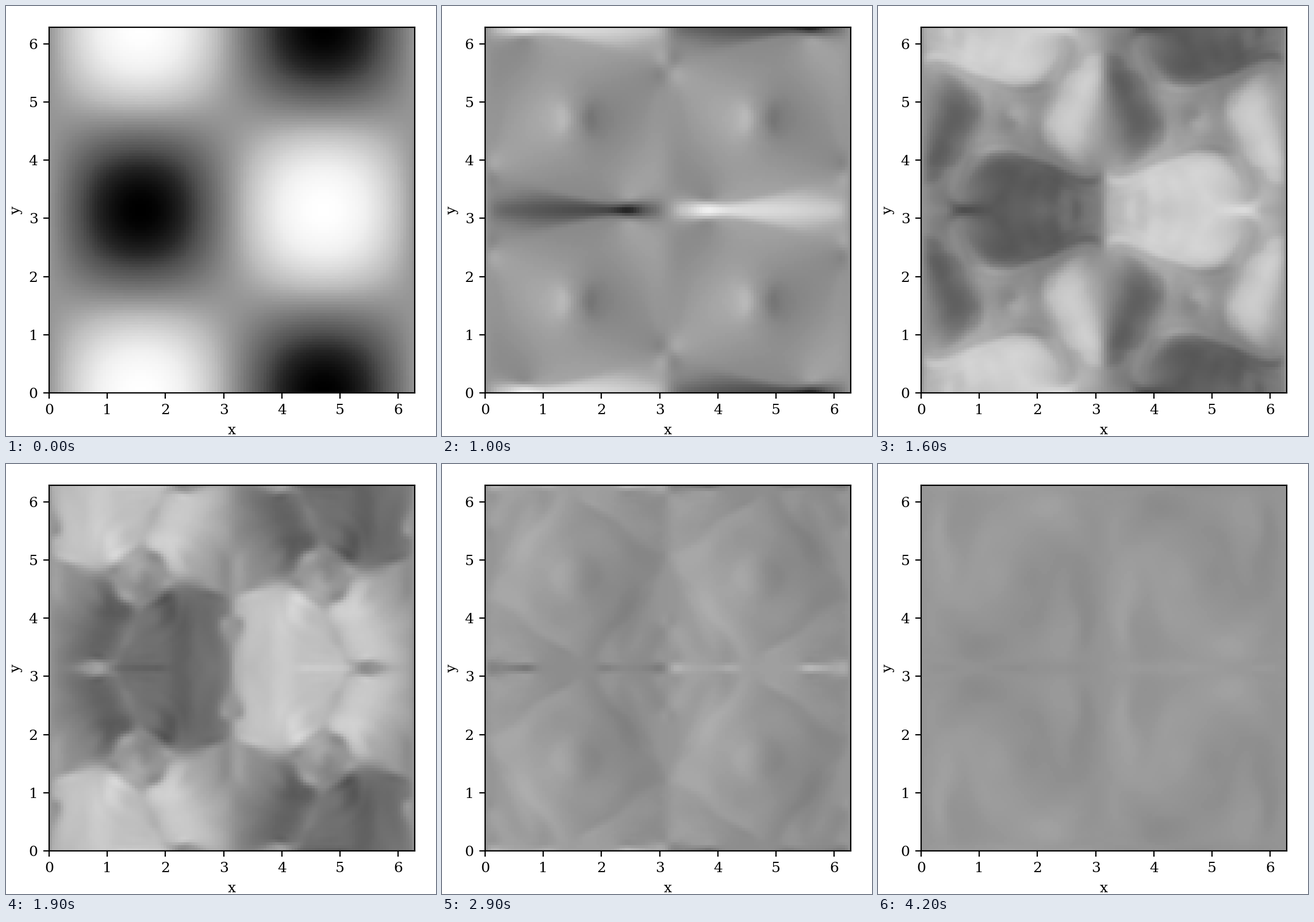
Recreate the animation shown at these times as a matplotlib script. Size 748 px wide and 748 px high, loop 4.4 s.

```python
import math
import numpy as np
import matplotlib.pyplot as plt
from matplotlib.animation import FuncAnimation

# Taylor-Green vortex in a periodic box. Its symmetries leave only modes whose
# wave numbers are all even or all odd, so one octant of [0, pi]^3 is enough.
FRAMES, INTERVAL = 44, 100
FRAME_TIME = 1.0
NU = 1 / 1600
M = 26          # modes per axis and parity
CELLS = 128     # displayed cells per axis

F = np.float32
wave = np.stack((2 * np.arange(M), 2 * np.arange(M) + 1)).astype(F)
kx = wave[:, :, None, None]
ky = wave[:, None, :, None]
kz = wave[:, None, None, :]
k2 = kx**2 + ky**2 + kz**2
damp = np.exp(-36 * np.minimum(np.sqrt(k2) / (2 * M), 1.2)**20).astype(F)
drag = NU * k2
k2[0, 0, 0, 0] = 1
sign = np.array([1, -1], F)[:, None, None, None]

points = (np.arange(M) + 0.5) * np.pi / (2 * M)
phase = wave[:, :, None] * points
to_grid = {"s": np.sin(phase).astype(F), "c": np.cos(phase).astype(F)}
weight = np.where(wave == 0, 1 / M, 2 / M)[:, None, :]
to_modes = {name: (t.transpose(0, 2, 1) * weight).astype(F)
            for name, t in to_grid.items()}


def transform(f, kinds, table):
    for kind in kinds:
        f = f.reshape(2, M, -1).transpose(0, 2, 1) @ table[kind]
        f = f.reshape(2, M, M, M)
    return f


def quarter_turn(f):
    """y component of a vector field from its x component."""
    return sign * f.swapaxes(1, 2)


def mix(f):
    return np.stack((f[0] + f[1], f[0] - f[1]))


def velocity(state):
    u = transform(state[0], "scc", to_grid)
    w = transform(state[1], "ccs", to_grid)
    return mix(u), mix(quarter_turn(u)), mix(w)


def rate(state):
    u, w = state
    v = quarter_turn(u)
    ug, vg, wg = velocity(state)
    ox = transform(kz * v - ky * w, "css", to_grid)
    oz = transform(ky * u - kx * v, "ssc", to_grid)
    ox, oy, oz = mix(ox), mix(-quarter_turn(ox)), mix(oz)

    a = transform(mix(vg * oz - wg * oy) / 2, "scc", to_modes)
    c = transform(mix(ug * oy - vg * ox) / 2, "ccs", to_modes)
    div = (kx * a + ky * quarter_turn(a) + kz * c) / k2
    return np.stack((a - kx * div - drag * u, c - kz * div - drag * w))


def step(q, dt):
    r1 = rate(q)
    r2 = rate(q + dt / 2 * r1)
    r3 = rate(q + dt / 2 * r2)
    r4 = rate(q + dt * r3)
    return (q + dt / 6 * (r1 + 2 * r2 + 2 * r3 + r4)) * damp


def advance(q):
    """One frame, with as many steps as the fastest flow needs."""
    speed = math.sqrt(sum(c**2 for c in velocity(q)).max())
    count = math.ceil(0.6 * M * FRAME_TIME * speed)
    for _ in range(count):
        q = step(q, FRAME_TIME / count)
    return q


cells = (np.arange(CELLS) + 0.5) * 2 * np.pi / CELLS
sin_x = np.sin(wave[:, :, None] * cells)
cos_y = np.cos(wave[:, :, None] * cells)


def mid_plane(q):
    """x velocity on the plane z = pi."""
    flat = (sign * q[0]).sum(axis=-1)
    return sum(cos_y[i].T @ flat[i].T @ sin_x[i] for i in range(2))


def simulate():
    q = np.zeros((2, 2, M, M, M), F)
    q[0, 1, 0, 0, 0] = 1
    planes = [mid_plane(q)]
    while len(planes) < FRAMES:
        q = advance(q)
        planes.append(mid_plane(q))
    return planes


planes = simulate()

plt.rcParams.update({"font.family": "DejaVu Serif", "font.size": 9})
SIZE, DPI = 748, 200
fig = plt.figure(figsize=(SIZE / DPI, SIZE / DPI), dpi=DPI, facecolor="white")
ax = fig.add_axes([75 / SIZE, 75 / SIZE, 636 / SIZE, 636 / SIZE])
end = 2 * np.pi
image = ax.imshow(planes[0], cmap="Greys", vmin=-1, vmax=1, origin="lower",
                  extent=(0, end, 0, end), aspect="auto",
                  interpolation="nearest")
ax.set_xticks(range(7))
ax.set_yticks(range(7))
ax.set_xlabel("x")
ax.set_ylabel("y")


def draw(i):
    image.set_data(planes[i])
    return (image,)


anim = FuncAnimation(fig, draw, frames=FRAMES, interval=INTERVAL,
                     repeat=True, repeat_delay=0, blit=False)
plt.show()
```
